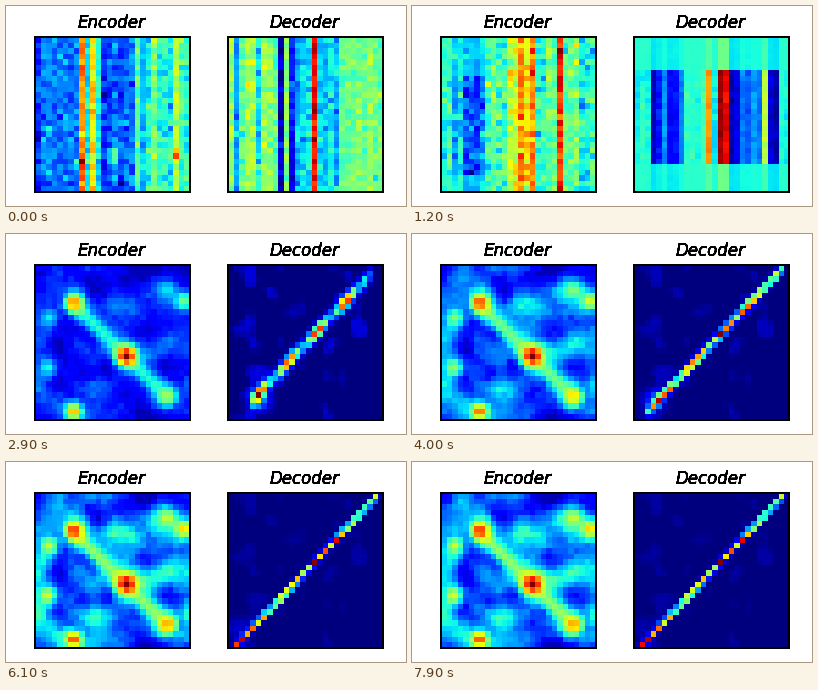
A matplotlib script that plays this animation: 400x200 px, repeating every 8 s.

```python
import numpy as np
import matplotlib.pyplot as plt
from matplotlib.animation import FuncAnimation

W, H, DPI = 400, 200, 100
N = 28
STEP, FRAMES = 100, 80
TIMES = [0, 1200, 2900, 4000, 4800, 6100, 7900]
LATE = 5

rng = np.random.default_rng(5)
row, col = np.mgrid[0:N, 0:N].astype(float)


def blob(c, r, s):
    return np.exp(-((col - c) ** 2 + (row - r) ** 2) / (2 * s * s))


def noise(reps=0):
    m = rng.normal(size=(N, N))
    for _ in range(reps):
        for axis in (0, 1):
            m = 2 * m + np.roll(m, 1, axis) + np.roll(m, -1, axis)
    return m / m.std()


def stripes(base, bars, jitter, spread=0.035):
    """Columns at a base level, with bars of (first, last, level) on top."""
    level = np.full(N, base)
    for first, last, value in bars:
        level[first:last + 1] = value
    return level + spread * rng.normal(size=N) + jitter * noise()


def enc_columns():
    m = stripes(.34, [(0, 7, .21), (8, 8, .72), (10, 10, .66), (12, 17, .18),
                      (18, 18, .47), (21, 21, .48), (25, 25, .48)], .045)
    return m + .2 * blob(8, 22, .9) + .18 * blob(14, 21, 1.1) + .3 * blob(25, 21, .6)


def dec_columns():
    return stripes(.5, [(1, 1, .3), (5, 5, .35), (9, 9, .12), (11, 11, .15),
                        (12, 19, .33), (15, 15, .87)], .045)


def enc_mixed():
    m = stripes(.4, [(2, 7, .27), (4, 6, .13), (12, 16, .62), (14, 14, .74),
                     (16, 16, .74), (21, 21, .82)], .06)
    outside = ((row < 7) | (row > 24)) & (col < 8)
    return m + .6 * outside * (.4 - m)


def dec_mixed():
    m = stripes(.34, [(3, 8, .17), (3, 4, .08), (6, 7, .09), (13, 13, .7),
                      (15, 16, .84), (17, 22, .22), (17, 18, .08),
                      (23, 23, .54), (24, 25, .08)], .015)
    return np.where((row >= 6) & (row <= 22), m, .36 + .15 * (m - .36))


# column, row, level of the bright spots along and around the ridge
SPOTS = [(6.5, 6.3, .88), (16, 15.9, 1), (23.5, 23.3, .74), (6.5, 26, .86),
         (1.7, 18, .62), (26.4, 6, .7), (2, 9, .6), (23.5, 4, .6)]
TEXTURE = noise(4)
SPECKS = np.clip(noise(2) - 1, 0, 1)
LEVELS = rng.uniform(.5, 1, N)


def enc_late(k):
    grown = 1 - np.exp(-1.2 * k)
    m = .14 + .11 * grown + (.045 + .035 * grown) * TEXTURE + .015 * noise()
    m = np.clip(m, .05, 1)
    along = (row + col) / 2
    ridge = np.exp(-((row - col) / 1.7) ** 2 / 2)
    ridge *= np.clip((along - 5) / 2, 0, 1) * np.clip((25 - along) / 2, 0, 1)
    m += np.clip(.4 + .13 * grown - m, 0, 1) * ridge
    for c, r, level in SPOTS:
        m += np.clip(level ** (2 - grown) - m, 0, 1) * blob(c, r, 1.2)
    return m


def dec_late(k):
    early = np.exp(-k)
    c = np.arange(N)
    wave = .6 + .3 * np.cos(2 * np.pi * (c - 10.3) / 5.2)
    level = early * wave + (1 - early) * LEVELS
    start, end = 5 * np.exp(-k / 2), 26.3 - 2 * early
    ends = np.clip(1 + (c - start) / 2, 0, 1) * np.clip(1 + end - c, 0, 1)
    width = .45 + .45 * early
    path = 28.1 - 1.07 * col
    m = level * ends * np.exp(-((row - path) / width) ** 2 / 2)
    tail = .3 * np.exp(-k / 2)
    return m + tail * blob(start, 24, 1.3) + (.03 + .05 * early) * SPECKS


ENC = [enc_columns(), enc_mixed()] + [enc_late(k) for k in range(LATE)]
DEC = [dec_columns(), dec_mixed()] + [dec_late(k) for k in range(LATE)]


def at(keys, ms):
    i = min(np.searchsorted(TIMES, ms, side="right") - 1, len(TIMES) - 2)
    u = (ms - TIMES[i]) / (TIMES[i + 1] - TIMES[i])
    m = np.clip(keys[i] * (1 - u) + keys[i + 1] * u, 0, 1)
    return m / m.max()


fig = plt.figure(figsize=(W / DPI, H / DPI), dpi=DPI, facecolor="white")


def panel(x, title, keys):
    ax = fig.add_axes([x / W, 14 / H, 155 / W, 155 / H])
    im = ax.imshow(at(keys, 0), cmap="jet", vmin=0, vmax=1,
                   interpolation="nearest", aspect="auto")
    ax.set(xticks=[], yticks=[])
    for s in ax.spines.values():
        s.set_linewidth(2 * 72 / DPI)
    # stacked copies harden the edges of the letters
    for _ in range(12):
        fig.text((x + 76.2) / W, 178 / H, title, size=12, style="italic",
                 family="DejaVu Sans", ha="center", va="baseline")
    return im


panels = [(panel(29, "Encoder", ENC), ENC), (panel(222, "Decoder", DEC), DEC)]


def update(n):
    for im, keys in panels:
        im.set_data(at(keys, n * STEP))
    return [im for im, _ in panels]


anim = FuncAnimation(fig, update, frames=FRAMES, interval=STEP,
                     repeat=True, repeat_delay=0, blit=False)
plt.show()
```
